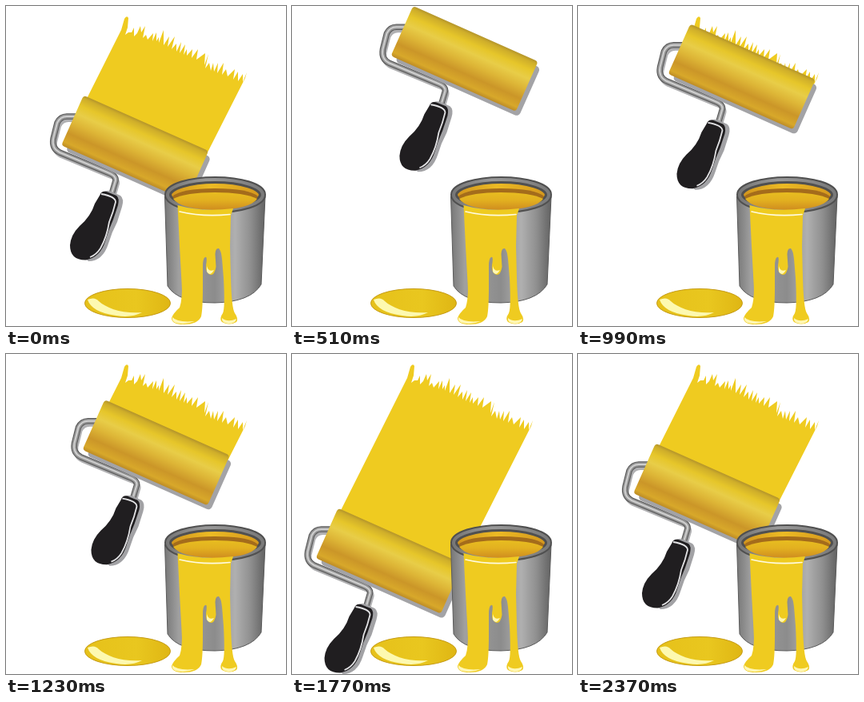
Animation of 350 by 400 pixels, one loop 2.4 s. Source, as an HTML page:

```html
<!DOCTYPE html>
<html lang="en">
<head>
<meta charset="utf-8">
<title>Paint roller</title>
<style>
html, body { margin: 0; width: 100%; height: 100%; overflow: hidden; background: #fff; }
svg { display: block; width: 100vw; height: 100vh; }
</style>
</head>
<body>
<svg viewBox="0 0 350 400">
  <defs>
    <linearGradient id="sleeve" x1="0" y1="0" x2="0" y2="1">
      <stop offset="0" stop-color="#b3942b"/>
      <stop offset=".06" stop-color="#cfae2a"/>
      <stop offset=".2" stop-color="#e6c62a"/>
      <stop offset=".36" stop-color="#e8cd48"/>
      <stop offset=".55" stop-color="#ddb536"/>
      <stop offset=".75" stop-color="#cb9628"/>
      <stop offset=".92" stop-color="#d8a82a"/>
      <stop offset="1" stop-color="#bd8c26"/>
    </linearGradient>
    <linearGradient id="metal">
      <stop offset="0" stop-color="#777"/>
      <stop offset=".14" stop-color="#a0a0a0"/>
      <stop offset=".5" stop-color="#8c8c8c"/>
      <stop offset=".7" stop-color="#b0b0b0"/>
      <stop offset=".85" stop-color="#909090"/>
      <stop offset="1" stop-color="#626262"/>
    </linearGradient>
    <linearGradient id="rim">
      <stop offset="0" stop-color="#777"/>
      <stop offset=".4" stop-color="#999"/>
      <stop offset="1" stop-color="#7a7a7a"/>
    </linearGradient>
    <linearGradient id="wall">
      <stop offset="0" stop-color="#cf921d"/>
      <stop offset=".45" stop-color="#edbb24"/>
      <stop offset="1" stop-color="#d3961d"/>
    </linearGradient>
    <linearGradient id="surface" x1="0" y1="0" x2="0" y2="1">
      <stop offset="0" stop-color="#e8bd20"/>
      <stop offset=".45" stop-color="#e2b020"/>
      <stop offset="1" stop-color="#cf8c1f"/>
    </linearGradient>
    <linearGradient id="pool">
      <stop offset="0" stop-color="#e6c11a"/>
      <stop offset=".6" stop-color="#e9c71f"/>
      <stop offset="1" stop-color="#dfb614"/>
    </linearGradient>
    <path id="rod" d="M88 138H76Q68 138 64 146L59 166Q57 178 67 183L127 208Q138 212 137 218L132 235"/>
    <clipPath id="rolled">
      <path id="edge" d="M-300-22 600 370V-600H-300Z"/>
    </clipPath>
  </defs>

  <g clip-path="url(#rolled)">
    <path fill="#efcb20" d="M144 30 148 16Q151 11 153 15L152 27 149 36 153 33 157 33 160 27 160 38 164 34 168 25 169 33 174 25 171 40 175 36 177 42 184 34 183 44 188 33 188 44 191 39 191 46 197 30 197 49 204 38 202 51 211 38 207 54 213 47 213 57 219 45 217 59 224 48 222 61 226 54 226 62 233 54 232 65 240 54 238 67 249 59 248 74 253 60 249 78 254 71 256 81 259 71 260 82 265 71 264 84 272 71 270 86 275 79 277 88 286 79 284 92 290 82 290 94 296 85 296 95 301 83 299 90 172 341 8 301Z"/>
  </g>

  <g id="roller">
    <g fill="none" stroke-linecap="round" stroke-linejoin="round">
      <use href="#rod" stroke="#b0b0b2" stroke-width="6" transform="translate(2 4)"/>
      <use href="#rod" stroke="#555" stroke-width="7.500"/>
      <use href="#rod" stroke="#949494" stroke-width="5.500"/>
      <use href="#rod" stroke="#cfcfcf" stroke-width="2"/>
    </g>
    <g transform="translate(97 111.5) rotate(24)">
      <rect x="8" y="6" width="169" height="67" rx="5" fill="#a3a3a6"/>
      <rect width="171" height="68.500" rx="4" fill="url(#sleeve)"/>
    </g>
    <path fill="#a2a2a5" d="M119 235Q124 229 132 232L143 237Q148 241 145 251L139 270Q132 283 128 297Q121 319 103 319L94 312Z"/>
    <path fill="#201e20" d="M117 237Q120 229 128 233L138 237Q142 240 140 249L134 267Q128 280 124 294Q118 314 100 317.500Q80 318 80 299Q81 286 92 275Q106 263 111 247Z"/>
    <path fill="none" stroke="#e2e2e4" stroke-width="1.800" d="M119 235Q137 238 137 245Q134 258 129 270Q126 289 118 303Q113 311 105 314"/>
  </g>

  <ellipse cx="152" cy="371.500" rx="53.500" ry="18" fill="url(#pool)" stroke="#c59a14"/>
  <path fill="#fdf9b0" d="M102 367Q111 363 116 369C126 378 146 385 170 383Q157 390 138 387Q107 383 102 367Z"/>

  <path fill="url(#metal)" stroke="#5b5b5b" d="M198.500 238 202 350Q215 371 261 371Q306 370 319 348L324 238Z"/>
  <ellipse cx="261.500" cy="236" rx="59" ry="18.500" fill="url(#wall)" stroke="#505050" stroke-width="9"/>
  <ellipse cx="261.500" cy="236" rx="59.500" ry="19" fill="none" stroke="url(#rim)" stroke-width="4"/>
  <path fill="#a46c1b" d="M208 238Q219 228 261 228Q304 228 315 238L312 243H211Z"/>
  <path fill="url(#surface)" d="M209 241Q225 233 261 233Q298 233 314 241Q305 254 261 255Q218 254 209 241Z"/>
  <path fill="#efcb20" d="M214.500 249Q245 258 284 253L281 262 280 300 281 340Q282 378 286 384Q291 391 288 395Q279 400 270 395Q266 391 271 384Q274 378 272 340L270 316Q269 306 266 303Q262 302 261.500 310L262.500 326Q261 336 256 336Q249 334 250 324Q252 312 249 314Q246 315 246 325V352Q246 378 244 388Q240 398 222 398Q207 398 207 390Q209 384 217 377Q221 365 219.500 345L217 300Z"/>
  <path fill="none" stroke="#fffbe0" stroke-width="1.600" stroke-linecap="round" d="M217 257Q246 264 280 260.500"/>
  <g fill="#fff7b4">
    <path d="M208 389Q214 396 236 394Q224 399 212 396Q207 394 208 389Z"/>
    <path d="M270 390Q277 396 288 391Q287 397 278 397Q269 396 270 390Z"/>
    <path d="M251 325Q253 333 260 330Q255 339 251 332Z"/>
  </g>
</svg>
<script>
const STEP = 30, COUNT = 80;
const HIGH = -113, LOW = 81, SLANT = -0.487;
const roller = document.getElementById('roller');
const edge = document.getElementById('edge');

const easeIn = u => u * u;
const easeOut = u => 1 - (1 - u) * (1 - u);
const mix = (a, b, u) => a + (b - a) * u;

// lift to the top, paint downwards, roll back up to the start
function offset(n) {
  if (n < 19) return mix(0, HIGH, easeOut(n / 19));
  if (n < 59) return mix(HIGH, LOW, easeIn((n - 19) / 40));
  return mix(LOW, 0, easeIn((n - 59) / 20));
}

function draw(ms) {
  const y = offset(Math.floor(ms / STEP + 1e-4) % COUNT);
  const move = `translate(${(y * SLANT).toFixed(2)} ${y.toFixed(2)})`;
  roller.setAttribute('transform', move);
  edge.setAttribute('transform', move);
}

const start = performance.now();
function tick() {
  draw(performance.now() - start);
  requestAnimationFrame(tick);
}
draw(0);
requestAnimationFrame(tick);
</script>
</body>
</html>
```
